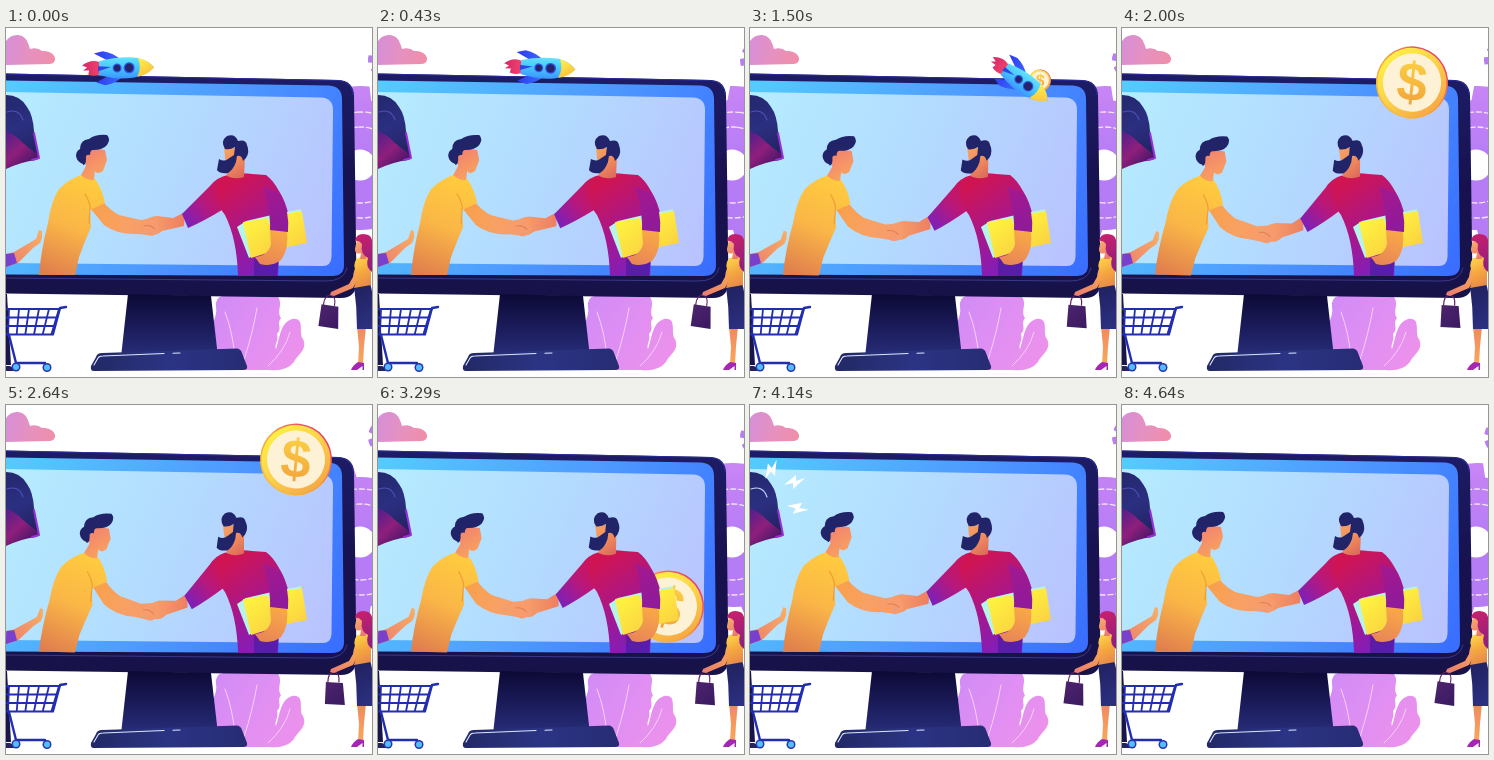
Animation, 366 px wide and 349 px high, one loop 4710 ms. Source, as an HTML page with a canvas:

```html
<!DOCTYPE html>
<html lang="en">
<head>
<meta charset="utf-8">
<title>Online deal</title>
<style>
html, body { margin: 0; width: 100%; height: 100%; overflow: hidden; background: #fff; }
canvas { display: block; width: 366px; height: 349px; }
</style>
</head>
<body>
<canvas id="stage" width="366" height="349"></canvas>
<script>
const ctx = document.getElementById('stage').getContext('2d');
const LOOP = 4710, BEAT = LOOP / 3, TAU = Math.PI * 2;
const NAVY = '#212468';

const clamp = v => Math.max(0, Math.min(1, v));
const span = (t, a, b) => clamp((t - a) / (b - a));

function grad(x0, y0, x1, y1, ...colors) {
  const g = ctx.createLinearGradient(x0, y0, x1, y1);
  colors.forEach((c, i) => g.addColorStop(i / (colors.length - 1), c));
  return g;
}
function fill(d, color) {
  ctx.fillStyle = color;
  ctx.fill(new Path2D(d));
}
function line(d, color, width = 1) {
  ctx.strokeStyle = color;
  ctx.lineWidth = width;
  ctx.stroke(new Path2D(d));
}
function disc(x, y, r, color) {
  ctx.fillStyle = color;
  ctx.beginPath();
  ctx.arc(x, y, r, 0, TAU);
  ctx.fill();
}
function group(draw) {
  ctx.save();
  draw();
  ctx.restore();
}
function turn(x, y, angle) {
  ctx.translate(x, y);
  ctx.rotate(angle);
  ctx.translate(-x, -y);
}

function gear(x, y, inner, outer, teeth, angle, color) {
  ctx.beginPath();
  const step = TAU / teeth;
  for (let i = 0; i < teeth; i++) {
    const a = angle + i * step;
    ctx.arc(x, y, inner, a - step * 0.62, a - step * 0.31);
    ctx.arc(x, y, outer, a - step * 0.24, a + step * 0.24);
    ctx.arc(x, y, inner, a + step * 0.31, a + step * 0.38);
  }
  ctx.fillStyle = color;
  ctx.fill();
}

function gears(t) {
  const a = t / BEAT * TAU / 9 - Math.PI / 2 - 0.06;
  gear(355, 137, 65, 79, 9, a, grad(0, 58, 0, 205, '#c885f4', '#b67cf6', '#b57cf4'));
  group(() => {
    ctx.strokeStyle = '#f5e6ff';
    ctx.lineWidth = 1.3;
    ctx.setLineDash([5, 3]);
    for (const r of [38, 53]) {
      ctx.beginPath();
      ctx.arc(355, 137, r, a, a + TAU);
      ctx.stroke();
    }
  });
  disc(354, 137, 15.5, '#fff');
  gear(381, 32, 15, 19, 8, -a, '#b780ee');
}

function cloud() {
  fill('M0 13C5 5 17 5 21 13Q23 17 24 21Q31 19 36 23C45 22 50 28 49 32Q48 36 43 36L0 37Z',
    grad(0, 20, 48, 32, '#d88fd6', '#e691bf', '#f08eaa'));
}

function plant() {
  fill('M211 331C207 319 211 314 207 305C204 295 212 289 210 279Q209 269 217 268H271C278 275 270 283 275 290C270 296 277 300 271 306C273 312 268 317 270 321C274 310 274 295 286 291C300 289 292 305 297 311C302 322 291 327 288 334Q280 344 263 342H225Z',
    grad(210, 280, 298, 335, '#d38cf6', '#e18ff2', '#ee92ea'));
  line('M238 332Q247 304 251 280M229 330Q227 305 219 284M262 338Q279 323 284 304', '#f6d0fb', 1);
}

function monitor() {
  fill('M0 45.500L333 52Q347 53 348 67L350.500 254Q350 270 335 270L0 265.500Z',
    grad(0, 46, 0, 270, '#1d1c66', '#17124f', '#171349'));
  line('M0 46L333 52.5Q346 54 347.500 67', '#2a2d98', 1);
  fill('M0 52.500L323 57.500Q336 58.500 336 71L338 237Q338 248 326 248L0 246.500Z',
    grad(0, 60, 338, 240, '#55cbfc', '#4f9cff', '#396dff'));
  fill('M0 64L315 69.500Q327 70 327 82L325.500 229Q325 239 315 238L0 235Z',
    grad(0, 70, 326, 210, '#b5ecff', '#b3dbff', '#b9c3ff'));
  line('M0 250L318 253Q338 254 341 240', '#3a388a', 1);
  fill('M122 266L205 268L212 329H115Z', grad(0, 267, 0, 327, '#0d0a37', '#1a1a58', '#262d78'));
  fill('M96 325L231 320.500Q235 321 236 325L241 338Q242 342 237 342L88 343Q84 343 85 338L90 329Q91 325 96 325Z',
    grad(85, 0, 241, 0, '#232966', '#2b3484', '#272c74'));
  line('M88 337L92 330Q93 328 97 328L158 325.500M167 325.200L174 325', '#dce6ff', 1.1);
}

function coin(t) {
  if (t < 1460 || t > 3500) return;
  const q = span(t, 1460, 2030) - 1;
  const size = 1 + 2.7 * q ** 3 + 1.7 * q * q;
  const drop = span(t, 2860, 3290);
  group(() => {
    ctx.globalAlpha = 1 - span(t, 3310, 3500);
    ctx.translate(290, 54.5 - 3 * (1 - size) + 147 * drop * drop);
    ctx.rotate(0.1 + drop * 0.2);
    ctx.scale(size, size);
    disc(0, 0, 36, grad(25, -25, -20, 25, '#e83e6c', '#f59a3b', '#f8b93f'));
    disc(0, 0, 34.5, grad(-25, -25, 25, 25, '#ffee45', '#fbd04a', '#f7a944'));
    disc(0, 0, 29, '#fdf2d6');
    ctx.fillStyle = grad(0, -22, 0, 22, '#fbcf43', '#f3a43c');
    ctx.font = 'bold 54px "Liberation Sans", Arial, sans-serif';
    ctx.textAlign = 'center';
    ctx.textBaseline = 'middle';
    ctx.fillText('$', 0, 3);
  });
}

function buyer(s) {
  group(() => {
    turn(50, 245, s * 0.033);
    group(() => {
      turn(90, 178, s * 0.09);
      fill('M84 180L98 175Q104 182 113 187L135 192L146 190Q154 194 153 202Q149 210 141 207L131 206Q112 207 98 197Z',
        grad(86, 180, 150, 205, '#f9a04a', '#f8a163', '#f79a70'));
      line('M138 198Q144 196 149 201', '#e07f55', 1);
    });
    fill('M75 147Q84 149 89 151Q96 160 99 175L84 182L85 199Q79 213 73 229L69 247H33Q35 222 42 195Q45 173 53 161Q63 151 75 147Z',
      grad(82, 150, 44, 246, '#ffcb3e', '#fab647', '#e07f4e'));
    line('M79 166Q85 176 84 182L83 195', 'rgba(226,130,50,.55)', 1.2);
    fill('M77 128Q82 120 92 121L99 122L101 132L97 143Q91 147 89 143L88 152Q81 153 75 147L80 138Z',
      grad(79, 124, 96, 150, '#f28271', '#f9a55c'));
    fill('M77 136Q71 134 70 128Q70 123 74 121Q74 112 83 111Q90 106 101 107Q105 111 101 117Q97 122 87 122Q84 122 84 127Q79 126 80 131Q80 137 77 137Z', NAVY);
  });
}

function seller(s) {
  const coat = grad(215, 160, 268, 240, '#d01452', '#a8178a', '#7c1fc0');
  group(() => {
    turn(224, 165, -s * 0.105);
    fill('M179 184L167 190L151 188Q140 189 137 195L141 205Q149 209 156 203L178 198Z',
      grad(140, 190, 178, 195, '#f8a46b', '#ed7f62'));
    fill('M222 147Q211 149 204 158L176 186L182 200Q198 193 216 182Z',
      grad(178, 192, 220, 156, '#7d20b8', '#b8187a', '#d01452'));
  });
  fill('M220 148Q232 144 246 146L260 147Q267 152 273 163Q280 174 283 189L278 211L265 213L273 228L272 248H232Q231 211 219 187Q209 176 211 160Z', coat);
  fill('M248 231L273 226L271 248H248Z', 'rgba(50,28,150,.5)');
  fill('M231 199L240 193L270 186L296 181L270 214L243 230Z', '#b8f3e8');
  fill('M237 194L262 190L271 222L245 230Z', grad(238, 194, 266, 226, '#fff53f', '#fad342'));
  fill('M272 187L296 183L301 215L276 220Z', grad(272, 186, 299, 218, '#fff53f', '#fbd042'));
  fill('M264 202L281 202Q283 222 275 232Q266 239 254 236L249 229Q262 228 265 216Z',
    grad(268, 203, 258, 236, '#f8a747', '#e98656'));
  fill('M257 158L274 166Q284 184 282 204L264 202Q265 186 257 158Z',
    grad(260, 160, 280, 204, '#a4188e', '#8c1b9c'));
  group(() => {
    turn(228, 150, -s * 0.045);
    fill('M218 119L231 120L239 129L238 149Q229 152 221 148Z',
      grad(218, 122, 236, 149, '#f6a264', '#f08c5c', '#dc6a5c'));
    fill('M219 121Q214 113 221 108Q229 105 232 113Q240 111 241 117Q244 124 240 130L237 133Q236 127 231 128L230 134Q227 142 222 145Q214 146 211 142L213 131Q218 134 222 131L228 127L229 119Q224 122 219 121Z', NAVY);
  });
}

function rocket(t) {
  if (t > 1780) return;
  group(() => {
    ctx.globalAlpha = 1 - span(t, 1540, 1780);
    ctx.translate(112 + t * (0.1196 - 9.8e-6 * t), 40 + t * (7.7e-6 * t - 0.0036));
    ctx.rotate((t * (0.0019 + 1.52e-5 * t) - 1) * Math.PI / 180);
    ctx.scale(1 - t * 2e-5, 1 - t * 2e-5);
    fill('M-18 -6Q-27 -10 -36 -3L-31 -1L-35 2L-29 2L-30 6Q-22 9 -17 5Z',
      grad(-36, 0, -17, 0, '#d8246c', '#f0466a'));
    fill('M-9 -7L-24 -15L-15 -17Q-4 -15 3 -8ZM-9 7L-22 14L-13 17Q-2 15 5 8Z',
      grad(-22, 0, 3, 0, '#2f3cf0', '#3b6bfa'));
    fill('M-19 -7Q0 -12 19 -10Q31 -7 36 0Q28 8 15 10Q-2 12 -19 7Z',
      grad(0, -10, 0, 10, '#62e0ff', '#47c6ff', '#3c98ff'));
    fill('M20 -10Q31 -7 36 0Q29 8 19 9Q24 0 20 -10Z', grad(20, -8, 30, 8, '#fff04a', '#fbc03f'));
    for (const [x, r] of [[-1, 4.5], [11, 5.5]]) {
      disc(x, 0, r, '#3157e8');
      disc(x, 0, r - 1.3, '#26236c');
    }
    fill('M-20 -2L-7 -1L-20 3Z', '#2f45e8');
  });
}

function bolt(x, y, angle, size) {
  group(() => {
    ctx.translate(x, y);
    ctx.rotate(angle);
    ctx.scale(size, size);
    fill('M-10 3L2 -7L2 -1L11 -4L-1 7L-1 1Z', '#fff');
  });
}

function megaphone(t) {
  const beat = t % BEAT, on = beat > 715 && beat < 1055;
  const p = span(beat, 715, 1000);
  group(() => {
    turn(0, 105, on ? Math.sin(p * Math.PI) * 0.025 : 0);
    fill('M0 67Q14 67 21 79Q27 87 28 103L33 131L0 123Z',
      grad(0, 68, 28, 128, '#24286e', '#2b2f80', '#222261'));
    fill('M0 103Q10 107 17 115L32 127Q34 131 30 132Q15 134 0 141Z',
      grad(0, 108, 25, 136, '#5a1f8a', '#8f1f7c', '#4a1668'));
    line('M28 105L33 130L26 132', '#9a2fd6', 2);
    line('M1 84Q13 80 17 92', on ? '#c7d8ff' : '#4b52b8', 1.2);
  });
  if (!on) return;
  bolt(13 + 8 * p, 67 - 2 * p, -0.72, 0.72 + 0.28 * p);
  bolt(26 + 18 * p, 76 + p, 0, 0.72 + 0.28 * p);
  bolt(32 + 15 * p, 93 + 10 * p, 0.5, 0.72 + 0.28 * p);
}

function shopper(s) {
  group(() => {
    turn(0, 235, s * 0.035);
    fill('M0 226L8 224L30 211L33 202L36 203L36 210L34 215L27 220L12 235L0 239Z',
      grad(0, 232, 35, 206, '#ec816d', '#f8ac64'));
    fill('M0 226L8 225L11 235L0 239Z', '#7840cc');
  });
  fill('M0 266H1L5 337H0Z', '#17154c');
  fill('M0 338H4Q8 340 7 343H0Z', '#24225f');
  const blue = '#222eb0';
  for (let i = 0; i < 6; i++) line(`M${3 + i * 10} 281L${2 + i * 8.7} 306`, blue, 1.8);
  line('M0 281L54 281M0 289.500H51M0 298H49M0 306.500H47', blue, 2);
  line('M60 279L54 280L47 306M3 307L10 335H39', blue, 2.4);
  for (const [x, y] of [[10, 339], [41, 339.5]]) {
    disc(x, y, 4.5, '#2a34b0');
    disc(x, y, 3, '#52bff8');
  }
}

function woman(s) {
  group(() => {
    ctx.translate(-1.5 + 3.5 * s, 0);
    group(() => {
      turn(326, 267, (1 - s) * 0.1);
      line('M320 277Q320 268 326 267Q332 268 331 277', '#642062', 1.2);
      fill('M318 277L335 278L337 300L317 299Z', grad(318, 276, 336, 300, '#4d246e', '#3a1a60'));
    });
  });
  fill('M352 235Q348 240 347 249L343 256L325 264L324 267L328 268L347 260Q353 249 355 240Z',
    grad(350, 236, 330, 268, '#f9ae4b', '#ec7f6d'));
  fill('M351 298H360L358 319L357 336L352 336L353 319Z', grad(0, 300, 0, 337, '#ef8a60', '#f8a95e'));
  fill('M352 334L358 335V342H356.500V338L351 342H345Q347 337 352 334Z', '#a626b4');
  fill('M348 258L364 255Q369 271 367 301H351Q351 279 348 258Z',
    grad(348, 258, 366, 298, '#20215f', '#2c3080'));
  fill('M351 230L365 228V257L348 260L352 245Q345 239 351 230Z',
    grad(348, 230, 363, 260, '#ffd84b', '#f4a63f', '#e4834e'));
  fill('M351 211H358L360 231H354L355 225Q349 227 349 221Z', grad(349, 212, 358, 230, '#f9af70', '#ec7a68'));
  fill('M349 213Q350 206 357 206Q365 206 366 212V244Q359 239 362 230Q354 226 356 216Q353 212 349 213Z',
    grad(350, 208, 366, 240, '#c8206c', '#8e1f80'));
}

function draw(t) {
  // Slow breathing shared by the figures
  const s = (1 - Math.cos(TAU * t / LOOP - 0.1)) / 2;
  ctx.fillStyle = '#fff';
  ctx.fillRect(0, 0, 366, 349);
  gears(t);
  plant();
  monitor();
  cloud();
  coin(t);
  seller(s);
  buyer(s);
  rocket(t);
  megaphone(t);
  shopper(s);
  woman(s);
}

ctx.lineCap = ctx.lineJoin = 'round';
const start = performance.now();
function tick() {
  draw((performance.now() - start) % LOOP);
  requestAnimationFrame(tick);
}
tick();
</script>
</body>
</html>
```
